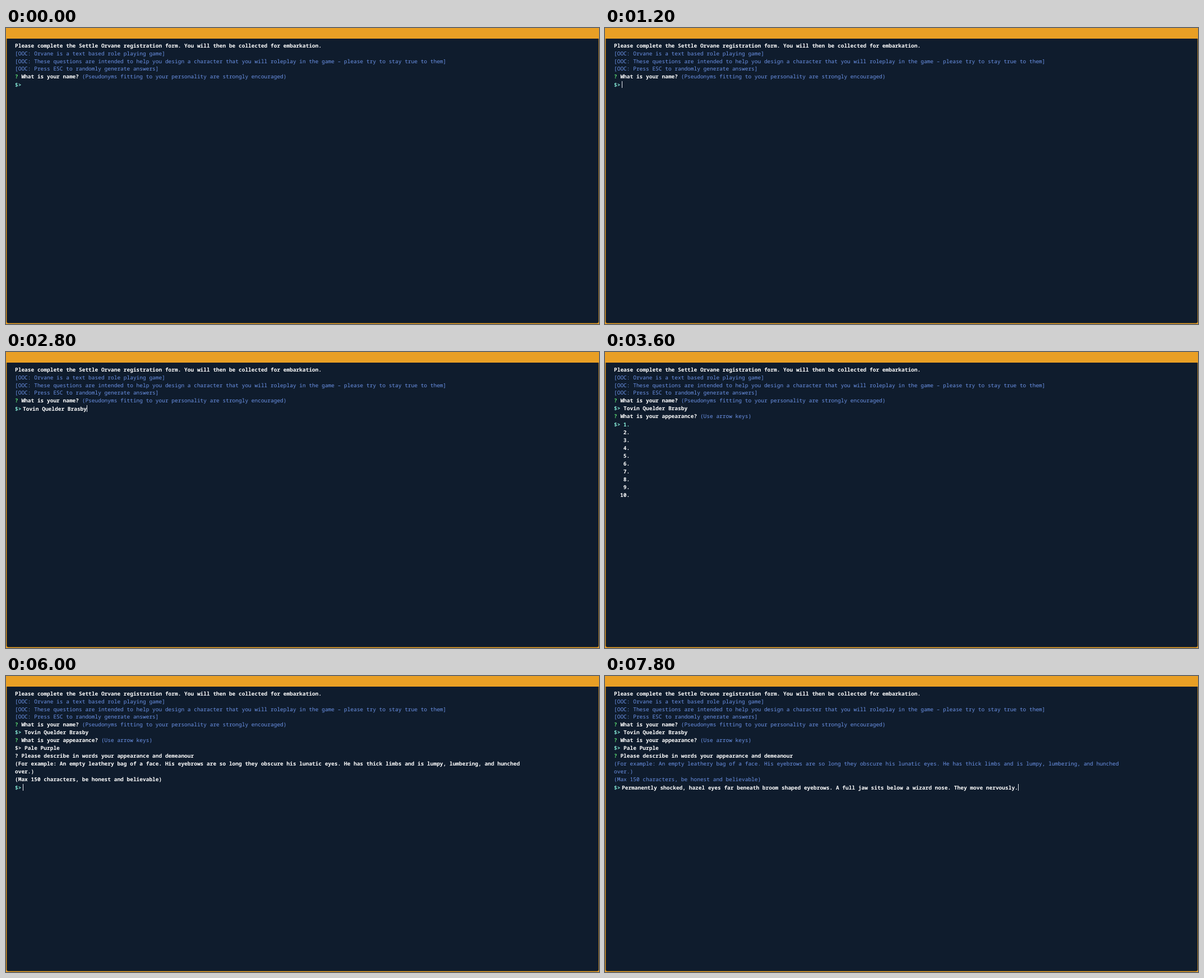
Animation, 1058 px wide and 529 px high, one loop 8000 ms. Source, as an HTML page:

```html
<!DOCTYPE html>
<html lang="en">
<head>
<meta charset="utf-8">
<title>Registration terminal</title>
<style>
  html, body { margin: 0; width: 100%; height: 100%; overflow: hidden; background: #e99f25; }
  svg { display: block; width: 1058px; height: 529px; }
  text {
    font: 600 9.5px "Noto Sans Mono", "DejaVu Sans Mono", monospace;
    text-rendering: geometricPrecision;
    white-space: pre;
  }
  .white { fill: #fff; }
  .blue { fill: #6c93e8; font-weight: 500; }
  .mint { fill: #88eeda; }
  .green { fill: #5bdc72; }
</style>
</head>
<body>
<svg viewBox="0 0 1058 529">
  <rect width="1058" height="529" fill="#e99f25"/>
  <path d="M1.3 19H1057.3V524.5Q1057.3 527.5 1054.3 527.5H4.3Q1.3 527.5 1.3 524.5Z" fill="#0f1c2d"/>
  <g id="screen"></g>
</svg>
<script>
const LOOP = 8000, CELL = 5.7, ROW = 13.95, BASE = 34.6;
const screen = document.getElementById('screen');

const FIRST_NAME = 'Juno Fallow Wex';
const NAME = 'Tovin Quelder Brasby';
const LOOKS = 'Permanently shocked, hazel eyes far beneath broom shaped eyebrows. ' +
  'A full jaw sits below a wizard nose. They move nervously.';
const SKINS = ['#a26a4b', '#d8954f', '#b9cdc5', '#61302a', '#a5b0e6',
  '#80602f', '#edb679', '#a2674a', '#d4934c', '#64312d'];

// A line is a sequence of [class, text] runs on one terminal row.
const line = (row, runs, x = 16, dy = 0) =>
  `<text x="${x}" y="${(BASE + row * ROW + dy).toFixed(2)}">` +
  runs.map(([cls, str]) => `<tspan class="${cls}">${str}</tspan>`).join('') + '</text>';

const question = (row, title, hint) =>
  line(row, [['green', '? '], ['white', title + ' '], ['blue', hint]]);

const answer = (row, str, mark = 'mint') => line(row, [[mark, '$&gt;'], ['white', ' ' + str]]);

const promptMark = row => line(row, [['mint', '$&gt;']], 16, 0.8);

// Active prompt; the caret blinks every 500 ms, counted from the last key press.
function prompt(row, str, t, since) {
  const caretOn = Math.floor(Math.max(0, t - since) / 500) % 2 === 0;
  const caretX = Math.floor(30.3 + str.length * CELL);
  const caretY = Math.round(25.6 + row * ROW);
  return promptMark(row) + line(row, [['white', str]], 30, 0.8) +
    (caretOn ? `<rect x="${caretX}" y="${caretY}" width="1" height="12" fill="#e6eaf0"/>` : '');
}

function portrait(i) {
  const shade = (d, opacity) => `<path d="${d}" fill="#1b1720" opacity="${opacity}"/>`;
  const curledUp = i === 9;
  const body = curledUp
    ? 'M5 2H10L14 5L15 11L12 16L7 18L2 16L0 10L2 5Z'
    : 'M4 1H5V0H6V1H10V0H11V1H12V7L14 8L15 11V16H12V17H3V16H0V11L1 8L4 7Z';
  const detail = curledUp
    ? shade('M3 5H6V7H3ZM9 4H11V8H9ZM4 10H7V12H4ZM9 11H13V12H9ZM6 14H10V15H6Z', 0.55)
    : shade('M5 3H7V4H5ZM9 3H11V4H9ZM6 6H10V7H6ZM3 11H4V16H3ZM11 11H12V16H11ZM5 11H10V12H5Z', 0.4) +
      shade('M0 13H3V16H0ZM12 13H15V16H12ZM4 7H12V8H4Z', 0.2);
  return `<g transform="translate(54 ${(123 + i * ROW).toFixed(2)})">` +
    `<path d="${body}" fill="${SKINS[i]}"/>${detail}</g>`;
}

function appearanceList(t) {
  const selected = t < 4300 ? 0 : Math.min(4, 1 + Math.floor((t - 4300) / 200));
  const items = SKINS.map((_, i) => {
    const label = String(i + 1).padStart(4) + '.';
    return line(7 + i, [[i === selected ? 'mint' : 'white', label]], 15.6, 0.8) +
      (t >= 3700 ? portrait(i) : '');
  });
  return promptMark(7) + items.join('');
}

function description(t) {
  const settled = t >= 6100;
  const hint = settled ? 'blue' : 'white';
  return answer(7, 'Pale Purple', settled ? 'mint' : 'white') +
    line(8, [[settled ? 'green' : 'white', '? '],
      ['white', 'Please describe in words your appearance and demeanour']]) +
    line(9, [[hint, '(For example: An empty leathery bag of a face. His eyebrows are so long they ' +
      'obscure his lunatic eyes. He has thick limbs and is lumpy, lumbering, and hunched']]) +
    line(10, [[hint, 'over.)']]) +
    line(11, [[hint, '(Max 150 characters, be honest and believable)']]) +
    (t < 6800 ? prompt(12, '', t, 6100) : prompt(12, LOOKS, t, 6800));
}

const intro =
  line(0, [['white', 'Please complete the Settle Orvane registration form. ' +
    'You will then be collected for embarkation.']]) +
  line(1, [['blue', '[OOC: Orvane is a text based role playing game]']]) +
  line(2, [['blue', '[OOC: These questions are intended to help you design a character that you ' +
    'will roleplay in the game – please try to stay true to them]']]) +
  line(3, [['blue', '[OOC: Press ESC to randomly generate answers]']]) +
  question(4, 'What is your name?', '(Pseudonyms fitting to your personality are strongly encouraged)');

function dialogue(t) {
  if (t < 1200) return promptMark(5);
  if (t < 1900) return prompt(5, '', t, 1200);
  if (t < 2800) return prompt(5, FIRST_NAME, t, 1900);
  if (t < 3600) return prompt(5, NAME, t, 2800);
  return answer(5, NAME) + question(6, 'What is your appearance?', '(Use arrow keys)') +
    (t < 6000 ? appearanceList(t) : description(t));
}

const start = performance.now();
let shown = '';
function tick() {
  const markup = intro + dialogue((performance.now() - start) % LOOP);
  if (markup !== shown) screen.innerHTML = shown = markup;
  requestAnimationFrame(tick);
}
tick();
</script>
</body>
</html>
```
